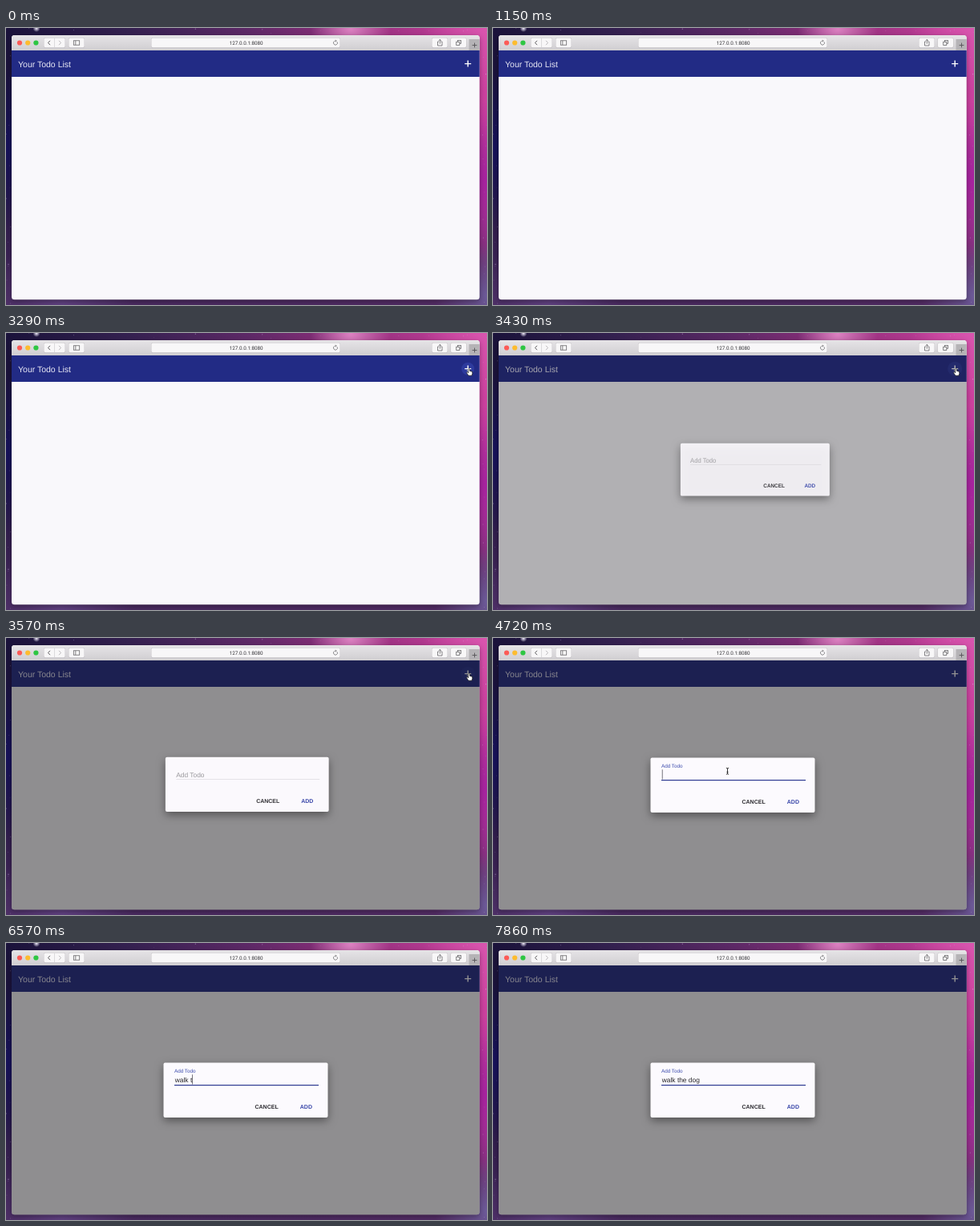
Animation of 600 by 346 pixels, one loop 8000 ms. Source, as an HTML page with a canvas:

```html
<!DOCTYPE html>
<html lang="en">
<head>
<meta charset="utf-8">
<title>Todo list</title>
<style>
html, body { margin: 0; width: 100%; height: 100%; overflow: hidden; background: #1c1440; }
canvas { display: block; width: 600px; height: 346px; }
</style>
</head>
<body>
<canvas id="stage"></canvas>
<script>
const W = 600, H = 346, LOOP = 8000, TICK = 1000 / 7;
const SANS = '"Liberation Sans", Arial, sans-serif';

// Moments of the story, in ticks of a seventh of a second.
const ENTER = 13, PRESS = 22, OPEN = 23, LEAVE = 25, FOCUS = 29, TYPE = 40;

const canvas = document.getElementById('stage');
const ctx = canvas.getContext('2d');
const dpr = window.devicePixelRatio || 1;
canvas.width = W * dpr;
canvas.height = H * dpr;
ctx.textRendering = 'geometricPrecision';

const clamp = (v, a = 0, b = 1) => Math.min(b, Math.max(a, v));
const lerp = (a, b, p) => a + (b - a) * p;
const mix = (a, b, p) => a.map((v, i) => lerp(v, b[i], p));
const easeOut = u => 1 - (1 - u) ** 2;
const smooth = u => u * u * (3 - 2 * u);

function rect(x, y, w, h, color) {
  ctx.fillStyle = color;
  ctx.fillRect(x, y, w, h);
}

function box(x, y, w, h, r, color) {
  ctx.beginPath();
  ctx.roundRect(x, y, w, h, r);
  ctx.fillStyle = color;
  ctx.fill();
}

function disc(x, y, r, color) {
  ctx.beginPath();
  ctx.arc(x, y, r, 0, Math.PI * 2);
  ctx.fillStyle = color;
  ctx.fill();
}

function shadow(alpha, blur, dy, paint) {
  ctx.save();
  ctx.shadowColor = `rgba(0,0,0,${alpha})`;
  ctx.shadowBlur = blur * dpr;
  ctx.shadowOffsetY = dy * dpr;
  paint();
  ctx.restore();
}

function gradient(x, y, ...colors) {
  const g = ctx.createLinearGradient(0, 0, x, y);
  colors.forEach((c, i) => g.addColorStop(i / (colors.length - 1), c));
  return g;
}

function glow(x, y, r, color) {
  const g = ctx.createRadialGradient(x, y, 0, x, y, r);
  g.addColorStop(0, color);
  g.addColorStop(1, color + '00');
  rect(x - r, y - r, 2 * r, 2 * r, g);
}

// Each path is a flat list of x, y pairs.
function lines(color, width, ...paths) {
  ctx.beginPath();
  for (const p of paths)
    for (let i = 0; i < p.length; i += 2)
      i ? ctx.lineTo(p[i], p[i + 1]) : ctx.moveTo(p[i], p[i + 1]);
  ctx.strokeStyle = color;
  ctx.lineWidth = width;
  ctx.stroke();
}

function text(str, x, y, font, color, align = 'left') {
  ctx.font = font;
  ctx.textAlign = align;
  ctx.fillStyle = color;
  ctx.fillText(str, x, y);
}

function plus(x, y, r, width, color) {
  lines(color, width, [x - r, y, x + r, y], [x, y - r, x, y + r]);
}

function chevron(x, dir, color) {
  lines(color, 0.9, [x - dir, 15.8, x + 1.5 * dir, 18.5, x - dir, 21.2]);
}

function frame(x, y, w, h, color) {
  ctx.strokeStyle = color;
  ctx.lineWidth = 0.75;
  ctx.strokeRect(x, y, w, h);
}

function wallpaper() {
  rect(0, 0, W, H, gradient(W, 0, '#1a123a', '#33204f', '#5c2866', '#98307f', '#cc419f'));
  rect(0, 0, W, H, gradient(0, H, '#4a2a6000', '#4a2a6000', '#4a2a6066', '#4a2a60f0'));
  glow(0, 150, 100, '#16115a');
  glow(430, 0, 50, '#dd82c2');
  glow(600, 0, 80, '#d955ae');
  glow(600, 190, 100, '#a6229f');
  glow(600, 335, 65, '#6c5a98');
  glow(70, 346, 90, '#5f4080');

  let seed = 11;
  const rnd = () => (seed = (seed * 16807) % 2147483647) / 2147483647;
  for (let i = 0; i < 40; i++) {
    const u = rnd(), v = rnd() * 7;
    const [x, y] = i % 3 === 0 ? [u * W, v] : [i % 3 === 1 ? v : 593 + v, u * H];
    disc(x, y, 0.3 + rnd() * 0.3, `rgba(225,205,245,${0.2 + rnd() * 0.4})`);
  }
  glow(38, 0.5, 4.5, '#f4f0ff');
}

function button(x, w) {
  box(x, 12.3, w, 12.4, 2, '#bdbbbe');
  box(x + 0.4, 12.5, w - 0.8, 11.7, 1.8, '#f8f7f8');
}

function browser() {
  shadow(0.35, 6, 2, () => box(7, 9, 583.7, 330.2, 3.5, '#f9f8fb'));
  box(7, 9, 583.7, 19.2, [3.5, 3.5, 0, 0], gradient(0, 28, '#f0eef0', '#e0dee1', '#d0ced1'));
  ['#fc5b57', '#fdbc2f', '#2ec643'].forEach((c, i) => disc(17 + i * 10.2, 18.5, 3.1, c));

  const ink = '#5e5d60';
  button(47, 27);
  lines('#cfcdd0', 0.7, [60.5, 12.7, 60.5, 24]);
  chevron(54, -1, '#4b4a4d');
  chevron(67, 1, '#b4b2b5');
  button(78, 20);
  frame(84.3, 15.8, 7.4, 5.4, ink);
  lines(ink, 0.75, [86.8, 15.8, 86.8, 21.2]);

  button(181, 236);
  text('127.0.0.1:8080', 299.7, 20.9, '6.3px Roboto, sans-serif', '#333236', 'center');
  ctx.beginPath();
  ctx.arc(411, 18.6, 2.5, -0.5, 5);
  ctx.strokeStyle = ink;
  ctx.lineWidth = 0.7;
  ctx.stroke();
  lines(ink, 0.7, [411, 14.8, 412.3, 16.1, 411, 17.3]);

  button(531, 20);
  lines(ink, 0.75, [540, 17, 538.5, 17, 538.5, 22, 544, 22, 544, 17, 542.5, 17],
    [541.3, 19.8, 541.3, 14.4], [539.8, 15.8, 541.3, 14.3, 542.8, 15.8]);
  button(554.5, 20);
  frame(563.4, 15.5, 4.1, 4.1, ink);
  rect(561.7, 17.3, 4.1, 4.1, '#f8f7f8');
  frame(561.7, 17.3, 4.1, 4.1, ink);
  rect(577.5, 14, 13.2, 14.2, '#b5b3b6');
  plus(584.5, 21.5, 2.9, 0.9, '#555457');
}

function page(n) {
  rect(7, 28, 583.7, 33, '#222b85');
  text('Your Todo List', 15, 48.5, '10.5px ' + SANS, '#e8e8f4');
  const age = n - PRESS;
  if (age >= 0 && age < 4)
    disc(576.2, 44.7, 9 * easeOut(clamp((age + 1) / 3)), `rgba(90,120,255,${0.26 * (1 - age / 4)})`);
  plus(576.2, 44.6, 4, 1.4, '#fff');

  const dim = 0.465 * clamp((n - OPEN) * 0.68);
  box(7, 28, 583.7, 311.2, [0, 0, 3.5, 3.5], `rgba(22,21,23,${dim})`);
}

function caretOn(n) {
  const since = n < TYPE + 1 ? n - FOCUS - 1 : Math.max(0, n - TYPE - 11.5);
  return since % 7 < 3.5;
}

function field(n) {
  const up = easeOut(clamp((n - FOCUS) / 3));
  text('Add Todo', 13.4, lerp(25, 12.6, up), `${lerp(8.45, 6.35, up)}px ${SANS}`,
    up ? '#3c4bad' : '#98979b');
  rect(13.5, 27.7, 180, 0.6, '#d6d5d9');
  if (!up) return;
  rect(103.5 - 90 * up, 27.5, 180 * up, 1.2, '#2d3a92');

  const typed = 'walk the dog'.slice(0, clamp(n - TYPE, 0, 12));
  text(typed, 14.3, 24.5, '8.4px ' + SANS, '#242327');
  if (caretOn(n)) rect(14.3 + ctx.measureText(typed).width, 14.8, 0.8, 12.2, '#55545c');
}

// Grows out of the add button and settles in the middle.
function dialog(n) {
  const p = 1 - Math.exp(-2.76 * (n - OPEN - 0.147));
  if (p <= 0) return;
  const [x, y, w, h] = mix([590, 26, 5, 40], [196.5, 149.5, 205, 68.5], p);
  ctx.save();
  ctx.globalAlpha = p;
  ctx.translate(x, y);
  ctx.scale(w / 205, h / 68.5);
  shadow(0.42, 11, 4, () => box(0, 0, 205, 68.5, 2, '#fcfafe'));
  field(n);
  const bold = 'bold 7px ' + SANS;
  text('CANCEL', 114, 57.5, bold, '#2c2b30');
  text('ADD', 170.3, 57.5, bold, '#3644a8');
  ctx.restore();
}

function arrow() {
  ctx.beginPath();
  [[0, 0], [0, 8], [1.8, 6.4], [3, 9.2], [4.3, 8.6], [3.1, 5.9], [5.5, 5.8]]
    .forEach(([x, y]) => ctx.lineTo(x, y));
  ctx.closePath();
  ctx.strokeStyle = '#fff';
  ctx.lineWidth = 1.1;
  ctx.stroke();
  ctx.fillStyle = '#111';
  ctx.fill();
}

function hand() {
  ctx.beginPath();
  ctx.moveTo(-0.9, 0.5);
  ctx.quadraticCurveTo(0, -0.9, 0.9, 0.5);
  ctx.lineTo(1, 3);
  ctx.lineTo(4, 3.8);
  ctx.quadraticCurveTo(4.7, 6, 3.4, 8.8);
  ctx.lineTo(-0.7, 8.8);
  ctx.lineTo(-3.2, 5.2);
  ctx.lineTo(-2.2, 4.4);
  ctx.lineTo(-0.9, 5.4);
  ctx.closePath();
  ctx.fillStyle = '#fff';
  ctx.fill();
  ctx.strokeStyle = '#111';
  ctx.lineWidth = 0.7;
  ctx.stroke();
}

function beam() {
  const hook = s => [-1.6, 4 * s, 0, 3.4 * s, 1.6, 4 * s];
  const paths = [hook(-1), [0, -3.4, 0, 3.4], hook(1), [-1, 1.2, 1, 1.2]];
  lines('rgba(255,255,255,.8)', 1.8, ...paths);
  lines('#1c1b1e', 0.9, ...paths);
}

function pointer(n) {
  if (n < ENTER || n > TYPE) return;
  const add = [577.6, 44.4];
  const [x, y] = n < LEAVE
    ? mix([544, 78], add, easeOut(clamp((n - ENTER) / 6)))
    : mix(add, [292.5, 166.3], smooth(clamp((n - LEAVE) / 5)));
  ctx.save();
  ctx.translate(x, y);
  if (Math.hypot(x - 576, y - 45) < 9) hand();
  else if (x < 390 && y > 160) beam();
  else arrow();
  ctx.restore();
}

function draw(now) {
  const n = Math.floor((now % LOOP + 5) / TICK) % 56;
  ctx.setTransform(dpr, 0, 0, dpr, 0, 0);
  wallpaper();
  browser();
  page(n);
  dialog(n);
  pointer(n);
}

const start = performance.now();
function loop() {
  draw(Math.max(0, performance.now() - start));
  requestAnimationFrame(loop);
}
loop();
</script>
</body>
</html>
```
